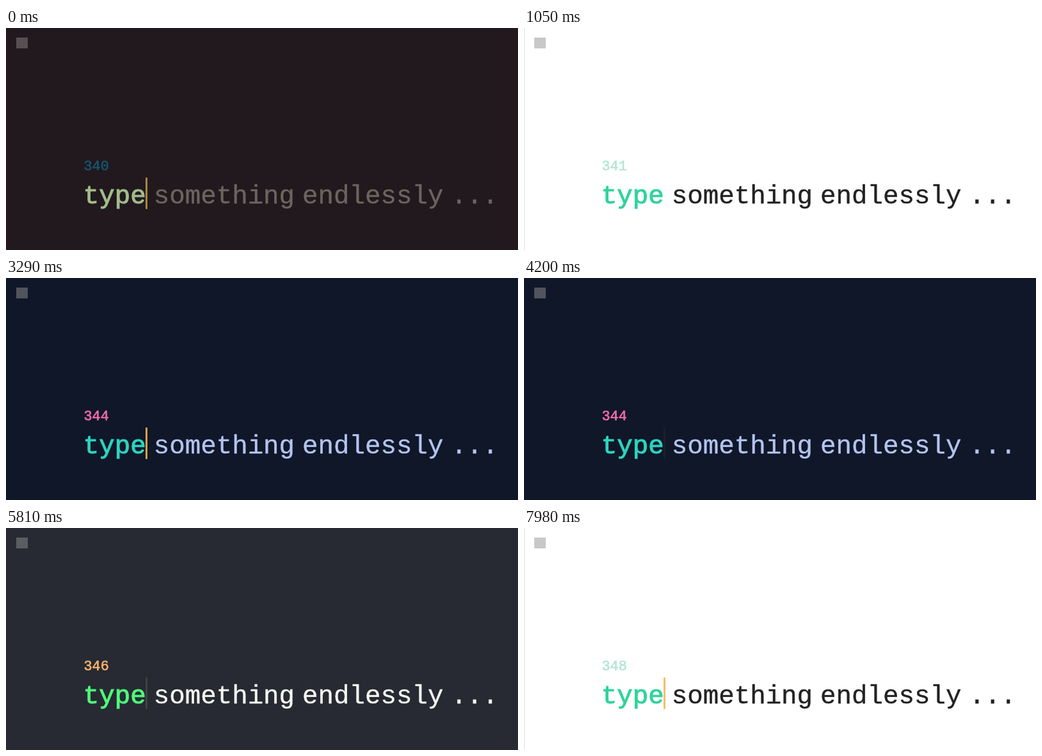
Animation, 800 px wide and 348 px high, one loop 8 s. Source, as an HTML page:

```html
<!DOCTYPE html>
<html lang="en">
<head>
<meta charset="utf-8">
<title>type something endlessly</title>
<style>
  html, body { margin: 0; width: 100%; height: 100%; overflow: hidden; }
  #stage {
    position: relative; width: 800px; height: 348px; overflow: hidden;
    font-family: "Liberation Mono", monospace;
  }
  #stage > * { position: absolute; }
  #edge { left: 0; top: 0; width: 1px; height: 348px; background: #dcdcdc; }
  #mark { left: 16px; top: 15px; width: 18px; height: 17px; }
  #count {
    left: 121.5px; top: 208.4px; font-size: 21.8px; line-height: 20px;
    -webkit-text-stroke: 0.7px currentColor;
  }
  #line {
    left: 120.8px; top: 243.7px; font-size: 40.8px; line-height: 40px;
    white-space: nowrap; display: flex; gap: 12px;
    -webkit-text-stroke: 0.4px currentColor;
  }
  #typed { -webkit-text-stroke: 1px currentColor; }
  #caret { left: 218px; top: 234px; width: 3px; height: 50px; border-radius: 1.5px; }
</style>
</head>
<body>
<div id="stage">
  <div id="edge"></div>
  <div id="mark"></div>
  <div id="count">340</div>
  <div id="line">
    <span id="typed">type</span><span>something</span><span>endlessly</span><span>...</span>
  </div>
  <div id="caret"></div>
</div>
<script>
  const LOOP = 8000;
  const FADE = 300;
  const COUNT_STEP = 1062;
  const BLINK = 1555;

  const plum = {
    bg: '#21191d', mark: '#565052', count: '#15556e', caret: '#f0bc5a',
    typed: [163, 188, 140], text: [107, 100, 95]
  };
  const light = {
    bg: '#ffffff', mark: '#c8c8c8', count: '#b4e6d5', caret: '#f7b955',
    typed: [48, 211, 154], text: [34, 34, 34], edge: true
  };
  const navy = {
    bg: '#0f1728', mark: '#50545c', count: '#f06ca8', caret: '#f2b24e',
    typed: [45, 212, 191], text: [180, 196, 240]
  };
  const slate = {
    bg: '#272a33', mark: '#5c5d62', count: '#f6b06a', caret: '#eaf088',
    typed: [80, 250, 123], text: [248, 248, 242]
  };
  const cues = [
    { at: -1000, theme: plum },
    { at: 70, theme: light },
    { at: 2090, theme: navy },
    { at: 4270, theme: slate },
    { at: 6420, theme: light }
  ];

  const el = id => document.getElementById(id);
  const [stage, edge, mark, count, line, typed, caret] =
    ['stage', 'edge', 'mark', 'count', 'line', 'typed', 'caret'].map(el);

  const smooth = x => x * x * (3 - 2 * x);
  const mix = (a, b, k) => `rgb(${a.map((v, i) => Math.round(v + (b[i] - v) * k)).join(',')})`;

  function draw(t) {
    const i = cues.findLastIndex(c => t >= c.at);
    const { at, theme } = cues[i];
    const before = cues[Math.max(0, i - 1)].theme;
    const k = smooth(Math.min(1, (t - at) / FADE));

    // Only the words fade between themes; everything else switches at once.
    stage.style.background = theme.bg;
    edge.style.display = theme.edge ? 'block' : 'none';
    mark.style.background = theme.mark;
    count.style.color = theme.count;
    line.style.color = mix(before.text, theme.text, k);
    typed.style.color = mix(before.typed, theme.typed, k);

    count.textContent = 340 + Math.ceil((t - 65) / COUNT_STEP);

    const phase = ((t - 1045 + BLINK) % BLINK) / BLINK;
    caret.style.background = theme.caret;
    caret.style.opacity = 1 - Math.abs(2 * phase - 1);
  }

  function tick() {
    draw(performance.now() % LOOP);
    requestAnimationFrame(tick);
  }
  tick();
</script>
</body>
</html>
```
